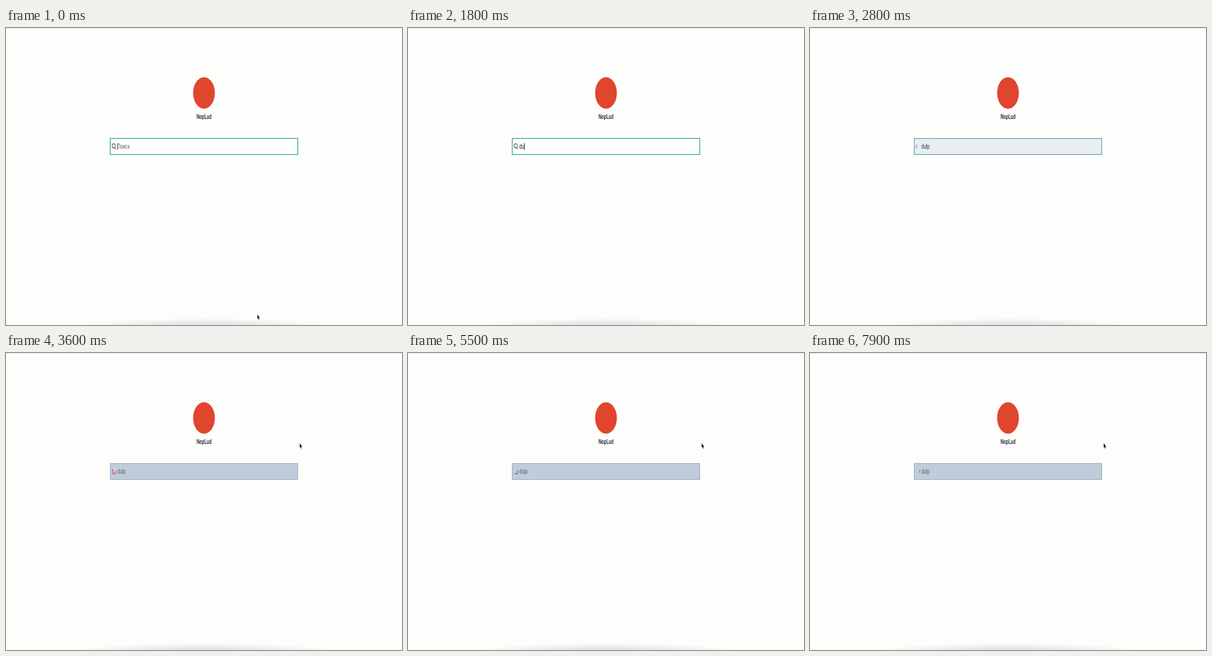
An HTML page for the animation above (8 s loop, 640 by 480 pixels).

```html
<!DOCTYPE html>
<html lang="ru">
<head>
<meta charset="utf-8">
<title>Поиск</title>
<style>
  html, body { margin: 0; width: 100%; height: 100%; overflow: hidden; background: #fdfdfb; }
  svg { display: block; width: 100vw; height: 100vh; }
  text { font-family: Roboto, "Open Sans", sans-serif; font-size: 10px; }
</style>
</head>
<body>
<svg viewBox="0 0 640 480">
  <defs>
    <radialGradient id="shade" gradientUnits="userSpaceOnUse" gradientTransform="translate(320 482) scale(215 13)" r="1" cx="0" cy="0">
      <stop offset="0" stop-color="#dcdce0"/>
      <stop offset=".4" stop-color="#e8e8ea"/>
      <stop offset="1" stop-color="#fdfdfb"/>
    </radialGradient>
  </defs>
  <rect width="640" height="480" fill="#fdfdfb"/>
  <rect width="640" height="1" fill="#e4e4e4"/>
  <rect x="105" y="469" width="430" height="11" fill="url(#shade)"/>

  <rect id="field" x="168.5" y="178.5" width="303" height="26"/>

  <!-- The recorded page is wider than the stage, so its content is narrowed as a whole. -->
  <g transform="translate(320 105) scale(.69 1)">
    <circle r="25.5" fill="#e0452d"/>
  </g>
  <g transform="translate(320 147) scale(.69 1)">
    <text text-anchor="middle" font-weight="500" fill="#1c1c2c">NopLud</text>
  </g>
  <g transform="translate(174.6 191.5) scale(.69 1)" fill="none">
    <path id="lens" d="M2.7 -1A3.5 3.5 0 1 1 -4.3 -1A3.5 3.5 0 1 1 2.7 -1M1.7 1.6L4.5 4.4" stroke="#2c2c38" stroke-width="1.1"/>
    <path id="spinner" stroke-width="1.4"/>
  </g>
  <g transform="translate(180 195) scale(.69 1)">
    <text id="query"></text>
    <rect id="caret" y="-9" width="1.4" height="11" fill="#1c1c2c"/>
  </g>

  <g id="pointer">
    <path id="arrow" transform="scale(.69 1)" d="M0 0V8L1.8 6.4L3.2 9.3L4.7 8.6L3.4 5.9H5.8Z" fill="#000" stroke="#fff" stroke-width=".3"/>
    <path id="beam" d="M-1.6 -4.2Q0 -4.2 0 -3.2Q0 -4.2 1.6 -4.2M0 -3.2V3.2M-1.6 4.2Q0 4.2 0 3.2Q0 4.2 1.6 4.2" fill="none" stroke="#333" stroke-width=".9"/>
  </g>
</svg>
<script>
const LOOP = 8000, STEP = 100;
const SUBMIT = 2800, WORD = 'dulp', KEYS = [1300, 1700, 1900, 2100];
const TEAL = [38, 166, 138], EDGE = [150, 170, 200], PAPER = [253, 253, 252], BUSY = [192, 204, 217];
const INK = [28, 28, 44], FADED = [88, 94, 112];
const RED = [205, 66, 66], BLUE = [62, 92, 180];
// time, middle angle in degrees, phase of the arc's length
const SPIN = [[2800, -180, -4], [3600, 110, .3], [4800, 540, 7.48], [6400, 1080, 15.71], [7900, 1440, 21.99]];

const el = id => document.getElementById(id);
const clamp = v => Math.min(1, Math.max(0, v));
const lerp = (a, b, p) => a + (b - a) * p;
const ramp = (t, from, to) => clamp((t - from) / (to - from));
const smooth = p => p * p * (3 - 2 * p);
const mix = (a, b, p) => `rgb(${a.map((v, i) => Math.round(lerp(v, b[i], p)))})`;
const set = (id, attrs) => {
  for (const key in attrs) el(id).setAttribute(key, attrs[key]);
};
const show = (id, on) => set(id, { visibility: on ? 'visible' : 'hidden' });

function drawField(t) {
  const busy = ramp(t, SUBMIT - STEP, SUBMIT + 2 * STEP);
  set('field', { fill: mix(PAPER, BUSY, busy), stroke: mix(TEAL, EDGE, busy), 'stroke-width': lerp(1.2, 1, busy) });

  const typed = WORD.slice(0, KEYS.filter(k => t >= k).length);
  const query = el('query');
  query.textContent = typed || 'Поиск';
  set('query', { fill: typed ? mix(INK, FADED, busy) : '#66666e' });
  set('caret', { x: typed ? query.getComputedTextLength() : 0, opacity: t < 500 ? .7 : 1 });
  show('caret', t < 500 || (t >= 1000 && t < SUBMIT));
}

function drawSpinner(t) {
  const busy = t >= SUBMIT;
  show('lens', !busy);
  show('spinner', busy);
  if (!busy) return;
  const i = Math.max(1, SPIN.findIndex(k => t <= k[0]));
  const [a, b] = [SPIN[i - 1], SPIN[i]];
  const p = ramp(t, a[0], b[0]);
  const middle = lerp(a[1], b[1], p);
  const length = 155 + 100 * Math.cos(lerp(a[2], b[2], p));
  const point = deg => {
    const r = deg * Math.PI / 180;
    return `${4 * Math.cos(r)} ${4 * Math.sin(r)}`;
  };
  const blue = .5 - .5 * Math.cos((t - 3600) / 2800 * 2 * Math.PI);
  set('spinner', {
    d: `M${point(middle - length / 2)}A4 4 0 ${length > 180 ? 1 : 0} 1 ${point(middle + length / 2)}`,
    stroke: mix(RED, BLUE, blue)
  });
}

function drawPointer(t) {
  const back = t >= SUBMIT;
  const p = smooth(back ? ramp(t, 2900, 3500) : ramp(t, 0, 600));
  const x = back ? lerp(342, 474.7, p) : lerp(406.3, 342, p);
  const y = back ? lerp(192, 145.5, p) : lerp(462.7, 192, p);
  const visible = t < KEYS[0] || t >= 3000;
  const inside = y > 178 && y < 205 && x < 472;
  set('pointer', { transform: `translate(${x} ${y})` });
  show('arrow', visible && !inside);
  show('beam', visible && inside);
}

function draw(now) {
  const t = Math.floor(now % LOOP / STEP) * STEP;
  drawField(t);
  drawSpinner(t);
  drawPointer(t);
}

const start = performance.now();
function tick() {
  draw(performance.now() - start);
  requestAnimationFrame(tick);
}
tick();
</script>
</body>
</html>
```
